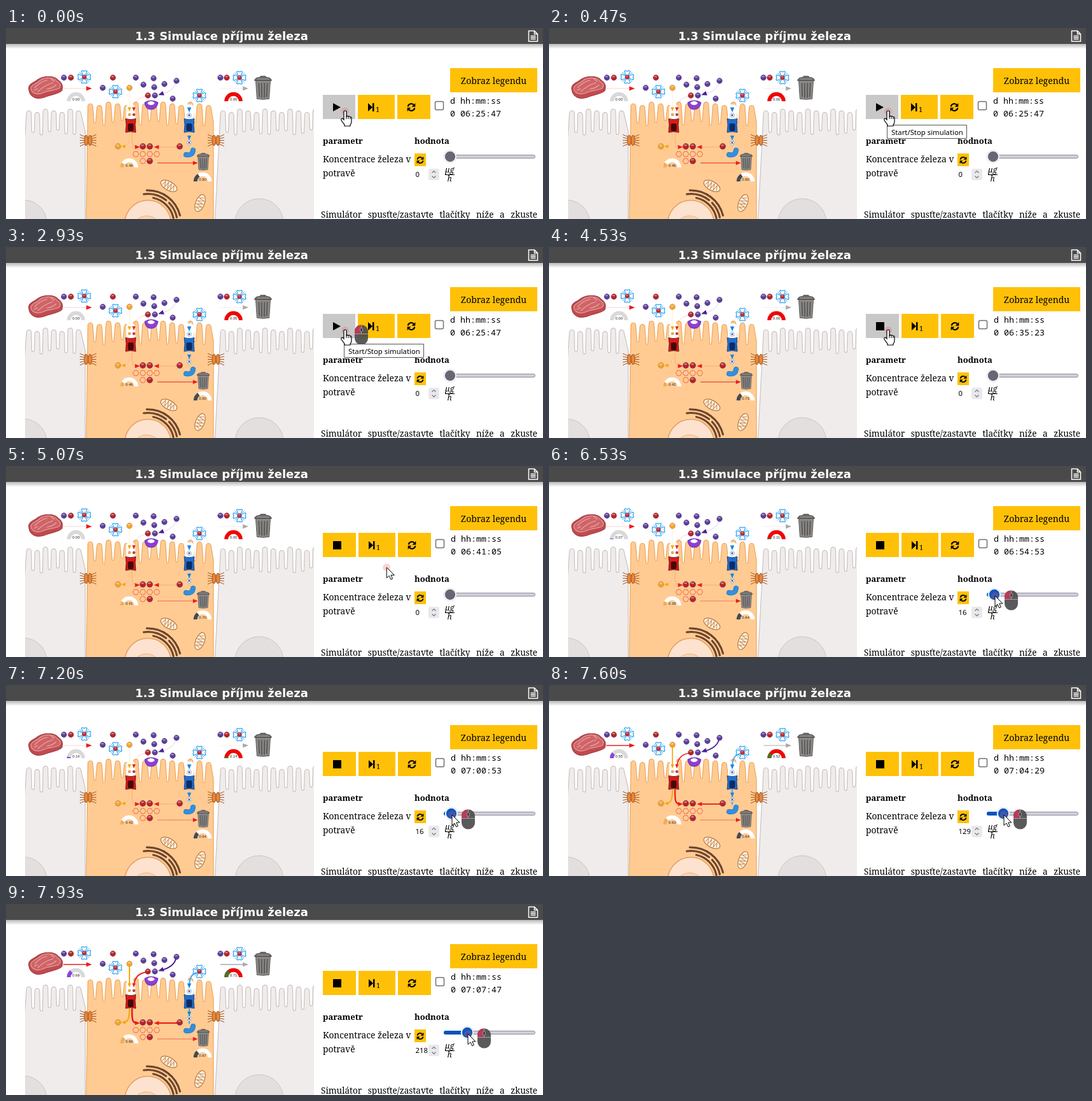
An HTML page with a canvas that plays this animation: 844 px wide and 300 px high, repeating every 8 s.

```html
<!DOCTYPE html>
<html lang="cs">
<head>
<meta charset="utf-8">
<style>
html, body { margin: 0; width: 100%; height: 100%; overflow: hidden; background: #fff; }
canvas { display: block; }
</style>
</head>
<body>
<canvas id="stage" width="844" height="300"></canvas>
<script>
const g = document.getElementById('stage').getContext('2d');
const LOOP = 8000, FPS = 15, TAU = Math.PI * 2;
const RED = '#ed1c1c', PURPLE = '#5b3d9c', ORANGE = '#f7a428', CRIMSON = '#b3242c';
const BLUE = '#35a3f0', AMBER = '#ffc107', HOVER = '#c8c8c9';
const SERIF = '"Noto Serif", serif', SANS = '"Noto Sans", sans-serif';

// Piecewise linear value at time t; keys are [time, value]
function track(t, keys) {
  if (t <= keys[0][0]) return keys[0][1];
  for (let i = 1; i < keys.length; i++) {
    const [t0, v0] = keys[i - 1], [t1, v1] = keys[i];
    if (t <= t1) return v0 + (v1 - v0) * (t - t0) / (t1 - t0);
  }
  return keys.at(-1)[1];
}

function shape(d, fill, stroke, width = 1) {
  const p = typeof d === 'string' ? new Path2D(d) : d;
  if (fill) { g.fillStyle = fill; g.fill(p); }
  if (stroke) { g.strokeStyle = stroke; g.lineWidth = width; g.stroke(p); }
}
function ellipse(x, y, rx, ry, fill, stroke, width, turn = 0) {
  const p = new Path2D();
  p.ellipse(x, y, rx, ry, turn, 0, TAU);
  shape(p, fill, stroke, width);
}
function box(x, y, w, h, fill, stroke, r = 0, width = 1) {
  const p = new Path2D();
  p.roundRect(x, y, w, h, r);
  shape(p, fill, stroke, width);
}
function text(s, x, y, font, color = '#000', align = 'left') {
  g.font = font; g.fillStyle = color; g.textAlign = align;
  g.fillText(s, x, y);
}
function at(x, y, turn, draw, scale = 1) {
  g.save(); g.translate(x, y); g.rotate(turn); g.scale(scale, scale); draw(); g.restore();
}
function justify(s, x, y, width, font) {
  g.font = font;
  const words = s.split(' '), widths = words.map(w => g.measureText(w).width);
  const gap = (width - widths.reduce((a, b) => a + b)) / (words.length - 1);
  words.forEach((w, i) => { text(w, x, y, font); x += widths[i] + gap; });
}

function ball(x, y, color, r = 4.4) {
  ellipse(x, y, r, r, color, 'rgba(40,10,30,.35)', .6);
  ellipse(x - r * .1, y - r * .4, r * .55, r * .28, 'rgba(255,255,255,.4)');
}
function flower(x, y, scale = 1) {
  at(x, y, 0, () => {
    for (let i = 0; i < 4; i++) {
      g.rotate(TAU / 4);
      shape('M-2 -3L-4.5 -9Q-3 -10.8 0 -9Q3 -10.8 4.5 -9L2 -3Z', '#fff', BLUE, 1.2);
      shape('M3.5 -3.5L7.5 -7.5', null, BLUE, 1);
    }
    ball(0, 0, '#d0272b', 3.2);
  }, scale);
}
function head(x, y, turn, color, size = 4) {
  at(x, y, turn, () => shape('M-1.2 -.9L1 0L-1.2 .9Z', color), size);
}
// Without any flow only a hairline remains
function flow(d, color, q, width = 2) {
  shape(d, null, color, Math.max(.2, width * q));
}
function gauge(x, y, value, color, back) {
  const arc = (from, to, c) => {
    const p = new Path2D();
    p.arc(x, y, 11.3, Math.PI * (1 + from), Math.PI * (1 + to));
    shape(p, null, c, 6);
  };
  arc(0, 1, back);
  if (value > 0) arc(0, value * .4, color);
  text(value.toFixed(2), x, y - 1, '6px "Liberation Sans", sans-serif', '#222', 'center');
}
function trash(x, y, scale) {
  at(x, y, 0, () => {
    shape('M-12 -12H12L10 18Q0 20 -10 18Z', '#8b8886', '#5c5a59');
    shape('M-7 -8L-6 15M-2.4 -8L-2 16M2.4 -8L2 16M7 -8L6 15', null, '#5b5958', 2);
    shape('M-14 -12Q-13 -17 -6 -17L-4 -19H4L6 -17Q13 -17 14 -12Z', '#6d6b6a', '#4c4a49');
    shape('M-10 -14.5H10', null, '#aaa');
  }, scale);
}

// Cell outline whose upper edge is a row of rounded fingers
function cell(left, right, first, step, count, top, low, rTop, rLow, fill, stroke) {
  const p = new Path2D();
  p.moveTo(left, 310);
  for (let i = 0; i < count; i++) {
    const x = first + i * step;
    p.arc(x, top + 3 * Math.sin(i * 2.1) + rTop, rTop, Math.PI, 0);
    if (i < count - 1) p.arc(x + step / 2, low + 4 * Math.sin(i * 1.7), rLow, Math.PI, 0, true);
  }
  p.lineTo(right, low);
  p.lineTo(right, 310);
  shape(p, fill, stroke, 1.2);
}
function desmosome(x, y) {
  at(x, y, 0, () => {
    for (const s of [-1, 1]) for (let i = -2; i <= 2; i++)
      shape(`M${s * 3} ${i * 3}Q${s * 8} ${i * 3} ${s * 13} ${i * 4.6}`, null, '#a4551f', 1);
    ellipse(-3, 0, 3, 8, '#e8863a', '#a3561f');
    ellipse(3, 0, 3, 8, '#e8863a', '#a3561f');
  });
}
function mitochondrion(x, y, turn) {
  at(x, y, turn, () => {
    ellipse(0, 0, 14, 7, '#fff1df', '#b97a42', 1.2);
    shape('M-10 3L-8 -4L-5 5L-3 -5L0 5L2 -5L5 5L7 -4L10 3', null, '#c58b55', 1);
  });
}
function carrier(x, y, color, dark) {
  box(x - 7, y - 33, 14, 26, '#fff', null, 5);
  at(x, y, 0, () => {
    shape('M-8 -10.5Q0 -8 8 -10.5L7 -1L8 11Q0 8.5 -8 11L-7 -1Z', color, dark, .8);
    box(-4.5, -3, 9, 12, dark, null, 2);
  });
}

function drawTissue() {
  g.save();
  g.beginPath(); g.rect(30, 60, 454, 240); g.clip();
  const pale = '#f0eceb', line = '#cac2c0';
  cell(20, 124.5, 36, 13, 7, 130, 162, 3.8, 2, pale, line);
  cell(328, 500, 341, 13.2, 12, 130, 162, 3.8, 2, pale, line);
  cell(126, 326, 132.5, 14.3, 14, 119, 148, 3.8, 1.3, '#ffcb93', '#eda75e');
  ellipse(27, 306, 37, 36, '#e3dfde', '#cbc5c3');
  ellipse(398, 306, 38, 38, '#e3dfde', '#cbc5c3');
  ellipse(223, 308, 36.5, 37.5, '#fde3cf', '#e59f62', 1.6);
  ellipse(221, 312, 20, 17, '#f9d3b4', '#eab488');
  g.lineCap = 'round';
  [[41, -78, -12], [46.5, -98, -52], [46.5, -44, -12], [52, -92, -14]].forEach(([r, a, b]) => {
    const p = new Path2D();
    p.arc(223, 307, r, a * TAU / 360, b * TAU / 360);
    shape(p, null, '#5d3824', 3);
    shape(p, null, '#8b5b3c', .8);
  });
  g.lineCap = 'butt';
  mitochondrion(256, 248, .5);
  mitochondrion(305, 275, -1.2);
  desmosome(129, 176.5);
  desmosome(330, 176.5);
  g.restore();
}

function drawIron(t) {
  const q = track(t, [[7300, 0], [7600, .85], [7930, 1]]);
  const stored = track(t, [[3870, 1], [4530, .9], [5670, .5], [7300, .5], [7930, .7]]);

  shape('M36 97C34 88 43 87 50 81C58 75 76 74 82 82C88 86 90 92 88 98C84 104 70 104 60 109C48 113 37 108 36 97Z', '#c14a50', '#a33f47', 1.2);
  shape('M39 94C40 89 49 87 54 82C62 77 76 77 80 84C86 87 87 92 83 95C74 99 66 98 58 102C48 106 39 102 39 94Z', '#cf6468', '#e3a19b', 1.2);
  shape('M45 94Q54 84 65 82M50 100Q60 90 74 86M64 96Q73 95 79 89M70 79L76 84M44 98L50 95', null, '#e9aaa5', 1.2);
  trash(404, 94, .96);

  flow('M90 95H130', RED, q, 1.6);
  head(131, 95, 0, RED);
  flow('M337 95H376', '#aaa', q, 1.3);
  head(377, 95, 0, '#aaa');

  for (const [x, y] of [[91, 78], [152, 94], [204, 78], [216, 89], [232, 79], [233, 93], [249, 88], [268, 83], [262, 111], [337, 78]])
    ball(x, y, PURPLE);
  for (const x of [102, 168, 347]) ball(x, 78, CRIMSON);
  ball(194, 94, ORANGE);
  for (const [x, y] of [[123, 77], [172, 100], [367, 78], [304, 106]]) flower(x, y);

  // Purple reductase
  shape('M218 117Q228 111 239 117Q237 128 228 128Q219 128 218 117Z', '#8e3fd1', '#6d2aa8');
  ellipse(228, 118, 5.5, 3, '#fff');
  carrier(196, 153, '#df1a1a', '#46080a');
  carrier(288, 153, '#216fd0', '#0b2c67');
  flow('M267 86C264 97 252 102 244 104', '#4b1f94', q);
  head(243, 104, 2.8, '#4b1f94');
  flow('M222 107C208 108 202 116 201 128', RED, q);
  flow('M194 98V129', '#f5a800', q);
  flow('M300 108C291 110 288 117 288 130', BLUE, q);
  ball(223, 106, CRIMSON);
  ball(234, 106, PURPLE);
  head(194, 128, TAU / 4, '#f5a800', 3);
  head(201, 128, TAU / 4, RED, 3);
  head(288, 129, TAU / 4, '#1684e6', 3.6);
  ball(194, 136, ORANGE, 2);
  ball(201, 136, CRIMSON, 2);
  flower(288, 137, .38);

  // Inside the cell
  flow('M194 164C194 180 192 186 183 186', '#f5a800', q);
  flow('M198 164C198 181 198 187 206 187', RED, q, 2.6);
  flow('M269 187H238', RED, q, 2.2);
  flow('M288 164V188', BLUE, q);
  head(288, 173, TAU / 4, '#1684e6', 3.4);
  flower(288, 180, .38);
  g.lineCap = 'round';
  shape('M283 199Q293 201 294 192', null, '#2375c0', 8);
  shape('M283 199Q293 201 294 192', null, '#318fe0', 6.6);
  g.lineCap = 'butt';
  ball(176, 186, ORANGE);
  head(184, 186, Math.PI, '#f5a800', 3);
  head(207, 187, 0, RED, 3.6);
  head(236, 187, Math.PI, RED, 3.6);
  for (const [x, y] of [[215, 186], [226, 186], [273, 186], [226, 209]]) ball(x, y, CRIMSON, 4.7);
  for (const [x, y] of [[204, 198], [215, 198], [226, 198], [237, 198], [215, 209]])
    at(x, y, 0, () => shape('M-4.6 0L-2.3 -4H2.3L4.6 0L2.3 4H-2.3Z', null, '#ed4a33', .8));
  g.setLineDash(stored < .8 ? [1.5, .8] : []);
  shape('M238 212H298', null, RED, .4 + stored * .7);
  g.setLineDash([]);
  head(298, 212, 0, RED, 3.5);
  trash(310, 210, .7);

  gauge(110, 115, track(t, [[6400, 0], [6530, .07], [6800, .13], [7300, .14], [7600, .55], [7930, .69]]), '#8846dd', '#d9d9d9');
  gauge(357.5, 115, track(t, [[6400, 0], [6530, .11], [7300, .14], [7600, .52], [7930, .71]]), '#477326', '#f00505');
  gauge(193.5, 219, track(t, [[3870, .46], [4530, .42], [5670, .39], [6530, .39], [7300, .42], [7600, .63], [7930, .66]]), '#f2ad52', '#fff');
  gauge(309, 241, track(t, [[3870, .8], [4530, .73], [5670, .67], [6530, .64], [7600, .64], [7930, .67]]), '#4a4a4a', '#fff');
}

function syncIcon(x, y, scale) {
  for (const turn of [0, Math.PI]) at(x, y, turn, () => {
    shape('M-5.3 -1A5.2 5.2 0 0 1 3.8 -3.6', null, '#000', 2.1);
    shape('M6.3 -6.5V-.8H.6Z', '#000');
  }, scale);
}

function drawHeader() {
  const shade = g.createLinearGradient(0, 25, 0, 33);
  shade.addColorStop(0, 'rgba(0,0,0,.28)');
  shade.addColorStop(1, 'rgba(0,0,0,0)');
  box(0, 25, 844, 8, shade);
  box(0, 0, 844, 25, '#4a4a4a');
  text('1.3 Simulace příjmu železa', 203, 19, 'bold 18px "DejaVu Sans", sans-serif', '#fff');
  shape('M821.5 4.5H830.5L835.5 9.5V21H821.5ZM830.5 4.5V9.5H835.5M824.5 12.5H832.5M824.5 15H832.5M824.5 17.5H832.5', null, '#fff', 1.5);
}

function drawPanel(t, pointer) {
  const running = t >= 3870, dx = running ? 1 : 0;
  const body = '13.8px ' + SERIF, bold = 'bold 13px ' + SERIF, mono = '13.33px "Noto Sans Mono", monospace';
  const button = (x, w) => {
    const over = pointer.x >= x && pointer.x < x + w && pointer.y >= 105 && pointer.y < 143;
    box(x, 105, w, 38, over ? HOVER : AMBER);
    pointer.hand ||= over;
  };
  box(698, 63, 137, 38, AMBER);
  text('Zobraz legendu', 766.5, 88, '14px ' + SERIF, '#000', 'center');

  button(498, 51 + dx);
  button(553 + dx, 58);
  button(615 + dx, 52);
  shape(running ? 'M514 118H527V131H514Z' : 'M514 118L526 124.5L514 131Z', '#000');
  at(dx, 0, 0, () => {
    shape('M569 118L576 124.5L569 131ZM576 118H578.5V131H576Z', '#000');
    text('1', 581, 131.5, '11px ' + SERIF);
    syncIcon(637, 124.5, 1);
    box(674.5, 115.5, 13, 13, '#fff', '#6f6f78', 2, 1.5);
    const clock = 23147 + 18 * Math.round(track(t, [[3870, 0], [4530, 32], [5670, 72], [6530, 97], [7600, 129], [7930, 140]]));
    const two = n => String(Math.floor(n)).padStart(2, '0');
    text('d hh:mm:ss', 698, 119, mono);
    text(`0 ${two(clock / 3600)}:${two(clock / 60 % 60)}:${two(clock % 60)}`, 698, 138.5, mono);
  });

  text('parametr', 498, 182, bold);
  text('hodnota', 642, 182, bold);
  text('Koncentrace železa v', 498, 211, body);
  text('potravě', 498, 233, body);
  box(642, 197, 18, 20, AMBER);
  syncIcon(651, 207.5, .85);

  const moved = dragged(t), thumb = 698 + moved, active = t >= 6325;
  text(String(Math.round(moved * 8.06)), 643.5, 234, '11.33px ' + SANS);
  box(664, 221, 17, 18, '#e9e9ed', null, 3);
  shape('M669.5 227.5L672.5 224.5L675.5 227.5M669.5 232.5L672.5 235.5L675.5 232.5', null, '#77777f', 1.2);
  text('μg', 690, 227, 'italic 12.5px ' + SERIF);
  shape('M690 230.5H705', null, '#000');
  text('h', 693.5, 241, 'italic 12px ' + SERIF);

  box(688.5, 199.5, 143, 5, '#d0d0d9', '#8f8f9d', 2.5);
  if (active) box(688, 199, thumb - 688, 6, '#0054b8', null, 3);
  ellipse(thumb, 202, 10, 10, '#fff', '#d5d5da', .8);
  ellipse(thumb, 202, 8.2, 8.2, active ? '#0a56c2' : pointer.x > 690 ? '#4c4b57' : '#686675');

  justify('Simulátor spusťte/zastavte tlačítky níže a zkuste', 495, 298, 340, '13.6px ' + SERIF);
}

// Slider travel in pixels
function dragged(t) {
  return t < 6465 ? 0 : Math.round(track(t, [[7300, 2], [7600, 16], [7930, 27]]));
}
function pointerAt(t) {
  const s = track(t, [[4730, 0], [5530, 1]]), ease = s * s * (3 - 2 * s);
  return { x: 533 + 168 * ease + (t < 6600 ? 0 : dragged(t) - 2), y: 131 + 73 * ease, hand: false };
}

function drawPointer(t, { x, y, hand }) {
  ellipse(x, y, 6, 6, 'rgba(240,90,90,.26)');
  if ((t >= 2930 && t < 2995) || t >= 6325) at(x + 25.5, y + 7, 0, () => {
    box(-10.5, -15.5, 21, 31, 'rgba(72,72,74,.9)', null, 10);
    shape('M-1 -15.5V-2H-10.5V-5Q-10.5 -15 -1 -15.5Z', '#b93a58');
    shape('M-10.5 -1.5H10.5M0 -15V-1.5', null, '#aaa', .9);
    box(-1.8, -11, 3.6, 6, '#333', '#aaa', 1.8);
  });
  if (t >= 470 && t < 2995) {
    box(531.5, 152.5, 125, 21, '#fff', '#555');
    text('Start/Stop simulation', 538, 167.5, '11.33px ' + SANS);
  }
  at(x, y, 0, () => {
    if (hand) {
      shape('M-2 1Q-2 -1 0 -1Q2 -1 2 1V8Q3.5 6.5 5 8Q7 7 8 9Q10 8 10 11V16Q10 19 8 21V23H-1V21L-6 14Q-7 11 -4 11L-2 13Z', '#fff', '#000', 1.2);
      shape('M2 8V12M5 8.5V12M8 9.5V12', null, '#000');
    } else {
      shape('M0 0V16.5L4 13L6.6 18.8L9.3 17.6L6.8 12H12Z', '#fff', '#000', 1);
    }
  });
}

function draw(now) {
  const t = Math.floor((now % LOOP + 5) * FPS / 1000) * 1000 / FPS + 3.4;
  box(0, 0, 844, 300, '#fff');
  const pointer = pointerAt(t);
  drawHeader();
  drawTissue();
  drawIron(t);
  drawPanel(t, pointer);
  drawPointer(t, pointer);
  requestAnimationFrame(draw);
}
requestAnimationFrame(draw);
</script>
</body>
</html>
```
